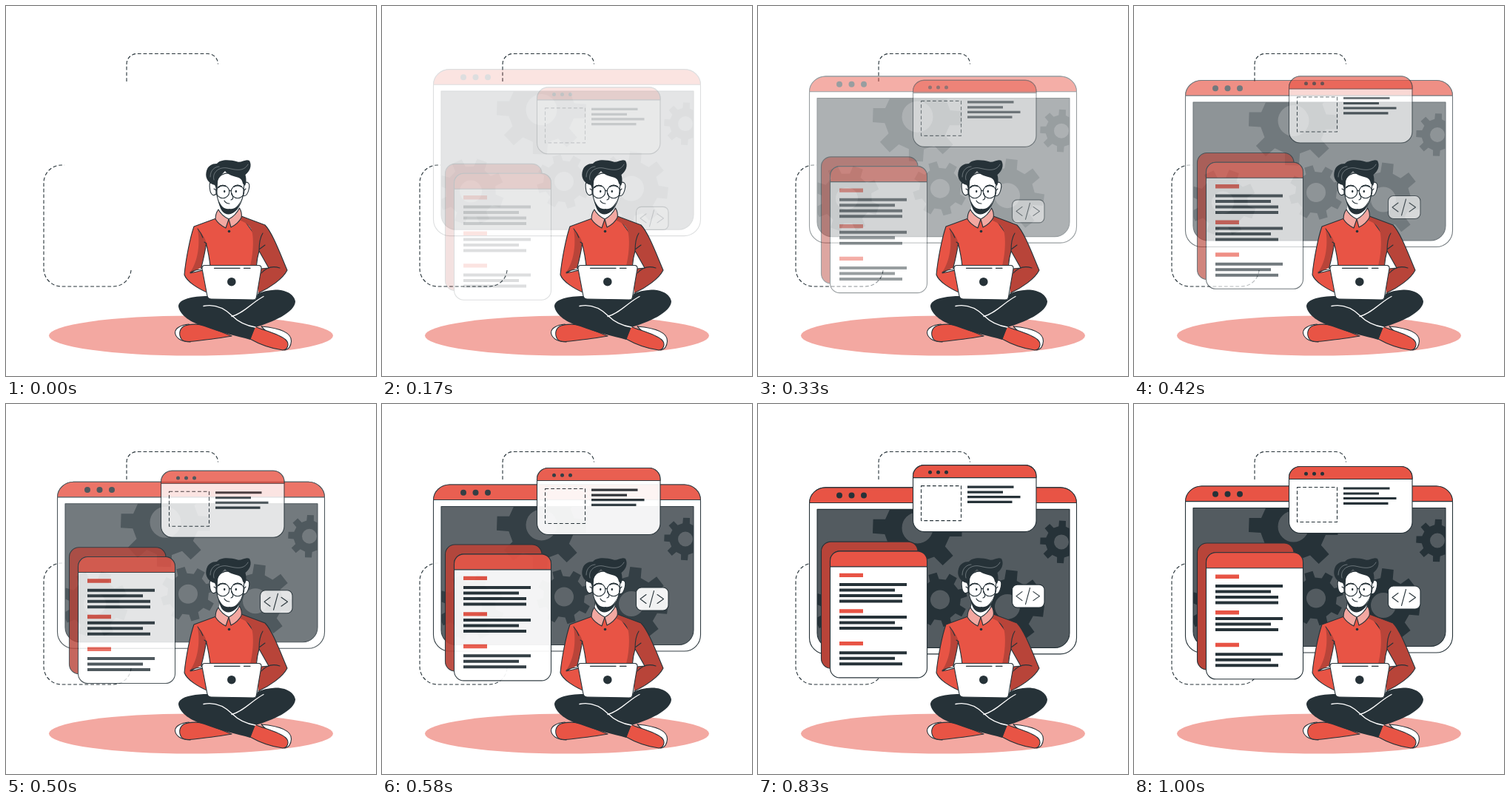
An HTML page that plays this animation: 500x500 px, repeating every 1.04 s.

```html
<!DOCTYPE html>
<html lang="en">
<head>
<meta charset="utf-8">
<title>Developer at work</title>
<style>
  html, body { margin: 0; width: 100%; height: 100%; overflow: hidden; background: #fff; }
  svg { display: block; width: 100vw; height: 100vh; }
  .ink { fill: #263238; stroke: none; }
  .red { fill: #e85445; }
  .deep { fill: #b84439; }
  .pink { fill: #f3a8a1; }
  .white { fill: #fff; }
  .line { fill: none; }
  .flat { stroke: none; }
  .dash { stroke-dasharray: 4.8 2.9; stroke-linecap: butt; }
</style>
</head>
<body>
<svg viewBox="0 0 500 500" stroke="#263238" stroke-width="1.1" stroke-linejoin="round" stroke-linecap="round">
  <defs>
    <clipPath id="screenClip"><path d="M80 140.5H421V307.5a20 20 0 0 1-20 20H100a20 20 0 0 1-20-20Z"/></clipPath>
  </defs>

  <ellipse class="pink flat" cx="250" cy="445.5" rx="192" ry="27"/>
  <g class="line dash">
    <path d="M163 102V79a14 14 0 0 1 14-14.5H272a14 14 0 0 1 14.5 14"/>
    <path d="M169 357a24 24 0 0 1-24 22H75a24 24 0 0 1-24-24V239a24 24 0 0 1 24-24H79"/>
  </g>

  <g id="monitor">
    <rect class="white" x="69.5" y="111" width="361" height="225" rx="22"/>
    <path class="red" d="M69.5 131.600a22 20.600 0 0 1 22-20.600H408.500a22 20.600 0 0 1 22 20.600Z"/>
    <g class="ink">
      <circle cx="110" cy="121.700" r="4"/><circle cx="126.500" cy="121.700" r="4"/><circle cx="143" cy="121.700" r="4"/>
    </g>
    <g clip-path="url(#screenClip)">
      <rect class="flat" x="80" y="140" width="341" height="188" fill="#535b60"/>
      <path id="gears" class="ink" fill-rule="evenodd"/>
    </g>
    <path class="line" d="M80 140.500H421V307.500a20 20 0 0 1-20 20H100a20 20 0 0 1-20-20Z"/>
  </g>

  <g id="panels">
    <rect class="white" x="209.500" y="84.500" width="166.500" height="90" rx="15"/>
    <path class="red" d="M209.500 101.500v-2a15 15 0 0 1 15-15H361a15 15 0 0 1 15 15v2Z"/>
    <g class="ink">
      <circle cx="232.500" cy="94.200" r="2.500"/><circle cx="243.500" cy="94.200" r="2.500"/><circle cx="254.500" cy="94.200" r="2.500"/>
    </g>
    <rect class="line dash" x="220.500" y="112.500" width="54" height="47"/>
    <path class="line" stroke-width="3.200" stroke-linecap="butt" d="M283 114H345.500M283 121H331M283 127.500H354.500M283 134.300H343.500"/>

    <rect class="deep" x="85.500" y="188" width="130.500" height="171" rx="13"/>
    <rect class="white" x="97.500" y="200.800" width="131" height="171" rx="13"/>
    <path class="red" d="M97.500 221.800v-8a13 13 0 0 1 13-13H215.500a13 13 0 0 1 13 13v8Z"/>
    <path class="line" stroke="#e85445" stroke-width="5.400" stroke-linecap="butt" d="M110 233.300H142M110 281.800H142M110 325.500H142"/>
    <path class="line" stroke-width="4" stroke-linecap="butt" d="M110 246H201M110 253.500H185M110 261H195M110 268.500H195M110 290H201M110 297.500H185M110 305H195M110 338.200H201M110 345.700H185M110 353.200H195"/>

    <rect class="white" x="343.500" y="246" width="43.500" height="31" rx="7"/>
    <path class="line" d="M357 255.500L349 261.500L357 267.500M367.500 250.500L361.500 272.500M372 255.500L380.500 261.500L372 267.500"/>
  </g>

  <g id="man">
    <!-- shirt -->
    <path class="red" d="M284 287L254 298C249 312 243 342 241 363C244 372 259 382 274 388L267 357L249 361L264 352L268 321L276 352H332L344 320L318 284Z"/>
    <path class="deep flat" d="M259 302C265 308 269 313 271 321C269 337 266 348 263 354L248 361C258 348 263 325 259 302Z"/>
    <path class="white" d="M270.500 321C269 334 266 345 263.500 355L267 352H276C275 341 273 331 270.500 321Z"/>
    <path class="deep flat" d="M318 284L350 296C360 306 371 336 380 357C374 369 356 381 341 388L339 351H330C335 332 335 308 331 301C328 295 322 292 317 290Z"/>
    <path class="white" d="M342 331C340 338 339 344 338.500 351H343L345 355L355 354Z"/>
    <path class="line" d="M318 284L350 296C360 306 371 336 380 357C374 369 356 381 341 388M259 301Q264 307 266 313M268 319L271 321M347 307C343 313 342 322 342 331M342 329L350 323M249 360C256 356 261 355 267 358M345 361C352 353 361 351 370 354"/>

    <!-- head -->
    <path class="white flat" d="M289 268L287 278L301 290L315 276L313 264Z"/>
    <path class="white" d="M284 239C277 234 274 238 275.500 247C276 254 280 258 284 254ZM320 240C326 236 330 239 328.500 246C327 254 324 258 320 256Z"/>
    <path class="white" d="M285 238V256C288 269 292 280 301 280C311 280 317 269 320.500 256L322 238C320 225 287 219 285 238Z"/>
    <path class="ink" d="M287 262C289 275 293 281.500 301 281.500C309 281 314 273 317 263C313 272 308 275 302 274C296 275 291 272 287 262Z"/>
    <path class="ink" d="M282 242C274 240 269 233 270.500 225C272 216 278 213 285 213C289 207 302 207 313 210.500C318 212 324 206 329 209C333 216 329 224 323.500 228C325 234 325 239 323 243L320 240C319 234 316 232 311 231C304 229 299 227 296 223C291 229 286 232 286 239L285 248Z"/>
    <path class="line" stroke="#8b9498" stroke-width=".7" d="M281 235C278 224 289 217 299 219C309 221 321 225 327 214M276 231C276 221 283 217 288 217"/>
    <g class="line">
      <circle cx="293" cy="251" r="8.800"/><circle cx="313" cy="251" r="8.800"/>
      <path d="M301.800 250Q303 248.500 304.200 250M284 249L281 247M322 249L324 247"/>
      <path stroke-width="1.800" d="M287 245Q291 241 297 243.500M308 244Q313 241 318 244"/>
      <path d="M305 253C307 258 308 261 304 262M295 263Q297 267 302 267"/>
    </g>
    <g class="ink">
      <ellipse cx="295.200" cy="250.500" rx="1.200" ry="1.800"/><ellipse cx="310.800" cy="250.500" rx="1.200" ry="1.800"/>
    </g>
    <path class="pink" d="M287 275C284 279 283 283 283 288C286 293 291 297 297 300L301 288C295 285 290 281 287 275ZM315.500 273C318 277 319 281 318 286C315 292 310 296 304 299L301 288C307 285 312 280 315.500 273Z"/>
    <circle class="ink" cx="301.500" cy="304.500" r="1.800"/>

    <!-- feet and legs -->
    <path class="white" d="M247 430C237 431 228 435 228.500 442C230 450 239 454 249 454L254 437Z"/>
    <path class="red" d="M242 432C234 435 233 444 237 450C240 454 246 454 254 453C271 451 288 449 305 446L270 432C260 429 248 430 242 432Z"/>
    <path class="white" d="M345 433C368 435 386 441 385.500 453C385 460 382 464 377 465Z"/>
    <path class="red" d="M336 433C350 439 369 443 378 451C384 457 380 465 374 465C359 463 344 458 330 450Z"/>
    <path class="ink" d="M273 392C252 392 233 396 233 406C235 418 250 428 268 433C288 441 313 446 330 451L337 434C359 428 391 414 391 399C389 388 375 383 364 383.500C354 384 346 386 340 389L337 397Z"/>
    <path class="line" stroke="#fff" stroke-width="1.300" d="M267 405.500C284 402 296 409 306 419C314 427 325 432 337 434M348 392.500C333 400 322 415 305 419.500"/>

    <!-- laptop -->
    <path class="white" d="M269 350.500H341Q345.500 350.500 345 355L338.500 393Q338 397 334 397L277 396Q273 396 272 392L265 355Q264.500 350.500 269 350.500Z"/>
    <path class="line" stroke-width="1.300" d="M281.500 354.300H316M321.500 354.300H330"/>
    <circle class="ink" cx="304.800" cy="372.700" r="5.800"/>
  </g>
</svg>
<script>
  const LOOP = 1040, FRAME = 1000 / 24, TRAVEL = 30;
  const byId = id => document.getElementById(id);

  // Eight tapered teeth around a ring with a round hole.
  function gear(cx, cy, outer, root, hole, turn) {
    const points = [];
    for (let i = 0; i < 8; i++) {
      for (const [r, offset] of [[root, -13], [outer, -9], [outer, 9], [root, 13]]) {
        const a = (turn + i * 45 + offset) * Math.PI / 180;
        points.push((cx + r * Math.cos(a)).toFixed(1) + ' ' + (cy + r * Math.sin(a)).toFixed(1));
      }
    }
    return `M${points.join('L')}ZM${cx - hole} ${cy}a${hole} ${hole} 0 1 0 ${2 * hole} 0a${hole} ${hole} 0 1 0 ${-2 * hole} 0Z`;
  }

  byId('gears').setAttribute('d', [
    [215.5, 165.5, 61, 45, 21, 2],
    [410, 184.5, 29, 21.5, 10, 3],
    [246, 262.5, 37, 28, 13, 29],
    [337, 272, 50, 37, 17, 7],
    [120, 276, 45, 34, 15, 20]
  ].map(args => gear(...args)).join(''));

  const bezier = (a, b, s) => 3 * (1 - s) * (1 - s) * s * a + 3 * (1 - s) * s * s * b + s * s * s;

  // Eased progress that overshoots before settling at 1.
  function ease(x) {
    let low = 0, high = 1;
    for (let i = 0; i < 24; i++) {
      const mid = (low + high) / 2;
      if (bezier(0.36, 0.5, mid) < x) low = mid; else high = mid;
    }
    return bezier(-0.01, 1.38, high);
  }

  function place(id, dy, opacity) {
    byId(id).setAttribute('transform', `translate(0 ${dy.toFixed(2)})`);
    byId(id).setAttribute('opacity', opacity);
  }

  let start;
  function draw(now) {
    start ??= now;
    const time = (now - start) % LOOP;
    const step = Math.floor((time + 4) / FRAME); // the motion runs at 24 steps per second
    const progress = step ? ease(Math.min(1, (step + 1) / 24.3)) : 0;
    const opacity = Math.min(1, progress);
    place('monitor', TRAVEL * (progress - 1), opacity);
    place('panels', TRAVEL * (1 - progress), opacity);
    requestAnimationFrame(draw);
  }
  draw(performance.now());
</script>
</body>
</html>
```
